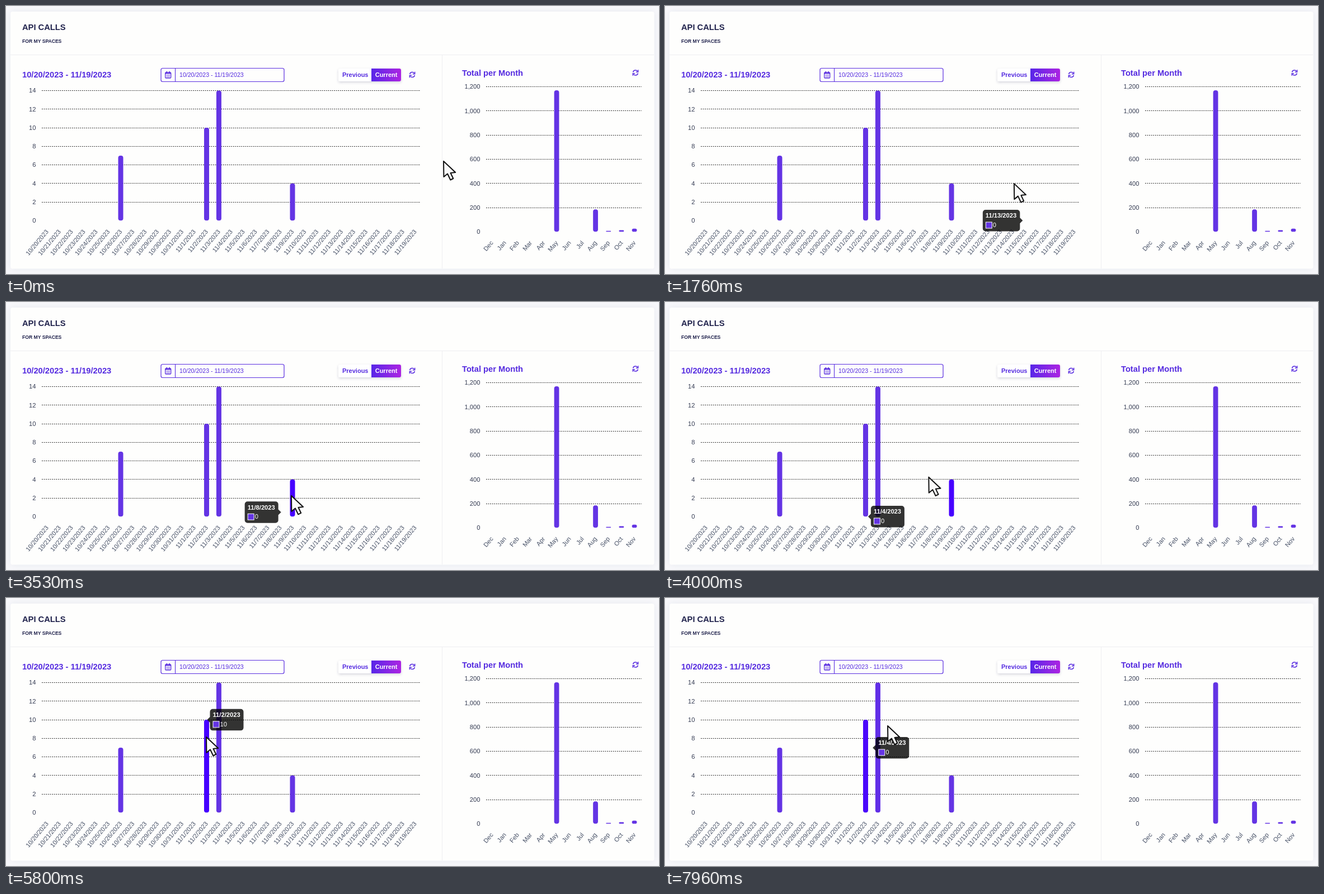
Write an HTML page that moves like this. It is 1167x480 px and loops after 8000 ms.

```html
<!DOCTYPE html>
<html lang="en">
<head>
<meta charset="utf-8">
<title>API calls</title>
<style>
html, body { margin: 0; width: 100%; height: 100%; overflow: hidden; background: #f8f8fb; }
svg { display: block; font-family: "Liberation Sans", Arial, sans-serif; }
.bold { font-weight: bold; }
.grid { stroke: #1c1c1c; stroke-dasharray: 1.8 1.8; }
.rule { stroke: #eeeef1; }
.icon { fill: none; stroke: #5a2ee0; stroke-width: 1.6; }
</style>
</head>
<body>
<svg id="stage" width="1167" height="480" viewBox="0 0 1167 480">
  <defs>
    <linearGradient id="active"><stop stop-color="#5828e8"/><stop offset="1" stop-color="#ac24e2"/></linearGradient>
    <filter id="cardShadow" x="-5%" y="-5%" width="110%" height="110%">
      <feDropShadow dx="0" dy="0" stdDeviation="7" flood-color="#8898aa" flood-opacity=".16"/>
    </filter>
    <filter id="btnShadow" x="-10%" y="-30%" width="120%" height="180%">
      <feDropShadow dx="0" dy="2" stdDeviation="2" flood-color="#32325d" flood-opacity=".2"/>
    </filter>
    <g id="refresh" class="icon">
      <path d="M-4.4-1A4.5 4.5 0 0 1 3.7-2.6M4.4 1A4.5 4.5 0 0 1-3.7 2.6"/>
      <path d="M4.7-5.2V-1.3H.9M-4.7 5.2V1.3H-.9" stroke-width="1.4"/>
    </g>
  </defs>
  <rect x="8" y="10" width="1150.5" height="460.5" rx="4" fill="#fefefd" filter="url(#cardShadow)"/>
  <path class="rule" d="M8 87.5H1158M779.5 87.5V470"/>
  <g filter="url(#btnShadow)">
    <rect x="594" y="112" width="112" height="23" rx="3" fill="#fff"/>
    <path d="M653 112H703a3 3 0 0 1 3 3V132a3 3 0 0 1-3 3H653Z" fill="url(#active)"/>
  </g>
  <g class="icon">
    <rect x="277" y="111.5" width="220" height="24" rx="3" stroke-width="1.2"/>
    <path d="M302.5 111.5V135.5" stroke-width="1.1"/>
    <rect x="284.7" y="119" width="10" height="10" rx="1.2" stroke-width="1.3"/>
    <path d="M284.7 120.7H294.7M287.3 117V120M292.2 117V120"/>
    <path d="M286.8 124H293M286.8 126.6H293" stroke-dasharray="1.5 .9" stroke-width="1.4"/>
  </g>
  <use href="#refresh" x="726" y="123"/>
  <use href="#refresh" x="1125" y="119.5"/>
  <g id="content"></g>
  <g id="tip">
    <path id="bubble" fill="#000" fill-opacity=".8"/>
    <text id="tipTitle" class="bold" x="5" y="14.4" font-size="11.2" fill="#fff"></text>
    <rect x="5.5" y="22" width="11" height="11" fill="#6434e4" stroke="#fff"/>
    <text id="tipValue" x="18" y="31" font-size="11.2" fill="#fff"></text>
  </g>
  <path id="cursor" d="M0 0L.4 28 7 22.5 12.3 33.5 17.3 31 12.5 21 21.2 20Z"
    fill="#fafafa" stroke="#111" stroke-width="2" stroke-linejoin="round"/>
</svg>
<script>
const $ = id => document.getElementById(id);
const content = $('content');
const DURATION = 8000, TIP_H = 38.5;
const BASE = [100, 52, 228], HOVER = [70, 0, 255];

function add(tag, attrs, text) {
  const el = document.createElementNS('http://www.w3.org/2000/svg', tag);
  for (const key in attrs) el.setAttribute(key, attrs[key]);
  if (text !== undefined) el.textContent = text;
  return content.appendChild(el);
}
const label = (text, x, y, size, fill, more) =>
  add('text', { x, y, 'font-size': size, fill, ...more }, text);

const bold = { class: 'bold' }, end = { 'text-anchor': 'end' };
const NAVY = '#20224c', VIOLET = '#552be0', INK = '#343b52';
const RANGE = '10/20/2023 - 11/19/2023';
label('API CALLS', 29, 42.5, 14.7, NAVY, bold);
label('FOR MY SPACES', 29, 66, 8.6, NAVY, bold);
label(RANGE, 29, 128, 14.7, VIOLET, bold);
label(RANGE, 310, 127, 10.6, VIOLET);
label('Previous', 601, 127, 11, VIOLET, bold);
label('Current', 659.7, 127, 11, '#fff', bold);
label('Total per Month', 815, 124.5, 14.7, VIOLET, bold);

// Draws axes and bars; returns the bars by index.
function chart(o) {
  for (let i = 0; i <= o.ticks; i++) {
    const y = o.zero - i * o.gap;
    if (i) add('path', { class: 'grid', d: `M${o.left} ${Math.floor(y) + .5}H${o.right}` });
    label((i * o.step).toLocaleString('en-US'), o.left - 10.5, y + 3.8, 11.2, INK, end);
  }
  o.names.forEach((name, i) => label(name, 0, 4, 11.2, '#465066',
    { ...end, transform: `translate(${o.first + i * o.pitch} ${o.zero + 17.7}) rotate(-50)` }));
  const bars = {};
  for (const i in o.values) {
    const h = o.values[i] * o.gap / o.step;
    bars[i] = add('rect', { x: o.first + i * o.pitch - o.width / 2, y: o.zero - h,
      width: o.width, height: h, rx: Math.min(4, h / 2), fill: `rgb(${BASE})` });
  }
  return bars;
}

const days = Array.from({ length: 31 }, (_, i) => {
  const d = new Date(2023, 9, 20 + i);
  return `${d.getMonth() + 1}/${d.getDate()}/2023`;
});
const daily = { names: days, values: { 6: 7, 13: 10, 14: 14, 20: 4 }, first: 73.4, pitch: 21.93,
  width: 9, left: 64, right: 741, zero: 384.3, gap: 33.24, step: 2, ticks: 7 };
const bars = chart(daily);
chart({ names: 'Dec Jan Feb Mar Apr May Jun Jul Aug Sep Oct Nov'.split(' '),
  values: { 5: 1170, 8: 185, 9: 7, 10: 13, 11: 26 }, first: 868.2, pitch: 23.17,
  width: 8.8, left: 858, right: 1136, zero: 404.3, gap: 43.3, step: 200, ticks: 6 });

const clamp = v => Math.max(0, Math.min(1, v));
const outQuad = u => 1 - (1 - u) ** 2;
const outQuart = u => 1 - (1 - u) ** 4;
const inQuad = u => u * u;
const smooth = u => u * u * (3 - 2 * u);
const inOutCubic = u => u < .5 ? 4 * u ** 3 : 1 - 4 * (1 - u) ** 3;

// start, end, x, y, easing
const moves = [
  [1467, 2300, 510, 347, outQuad],
  [3475, 4735, 377, 232.5, inOutCubic],
  [5000, 5750, 358, 249, smooth],
  [7670, 7960, 398, 229, inQuad]
];
// time, hovered day
const hovers = [
  [1490, 30], [1515, 29], [1551, 28], [1592, 27], [1637, 26], [1685, 25], [1738, 24],
  [1795, 23], [1863, 22], [1945, 21], [2062, 20],
  [3365, 19], [3560, 18], [3690, 17], [3800, 16], [3985, 15], [4310, 14],
  [5360, 13], [7800, 14], [7912, 15]
];
// day, start, length, direction
const fades = [
  [20, 2060, 400, 1], [20, 3980, 450, -1],
  [14, 4500, 400, 1], [14, 5080, 450, -1],
  [13, 5360, 430, 1], [13, 7860, 400, -1], [14, 7880, 400, 1]
];

function cursorAt(t) {
  let x = 782, y = 278;
  for (const [a, b, tx, ty, ease] of moves) {
    const k = ease(clamp((t - a) / (b - a)));
    x += (tx - x) * k;
    y += (ty - y) * k;
  }
  return [x, y];
}

function tipTarget(i) {
  const w = days[i].length > 9 ? 66.5 : 60;
  const cx = daily.first + i * daily.pitch;
  const top = daily.zero - (daily.values[i] || 0) * daily.gap / daily.step;
  if (i === 14) return { x: cx - w / 2, y: top + 7, w, side: 'top' };
  const left = i <= 15;
  return { x: left ? cx + 6 : cx - 6 - w, y: top - TIP_H / 2, w, side: left ? 'left' : 'right' };
}

function drawTip(t) {
  const past = hovers.filter(h => h[0] <= t);
  $('tip').setAttribute('opacity', past.length ? clamp((t - hovers[0][0]) / 200) : 0);
  if (!past.length) return;
  let { x, y } = tipTarget(past[0][1]);
  past.forEach(([start, i], n) => {
    const goal = tipTarget(i), until = n + 1 < past.length ? past[n + 1][0] : t;
    const k = outQuart(clamp((until - start) / 400));
    x += (goal.x - x) * k;
    y += (goal.y - y) * k;
  });
  const day = past[past.length - 1][1], { w, side } = tipTarget(day), mid = TIP_H / 2;
  const caret = {
    top: `M${w / 2 - 5} 0l5-5 5 5Z`,
    left: `M0 ${mid - 5}l-5 5 5 5Z`,
    right: `M${w} ${mid - 5}l5 5-5 5Z`
  }[side];
  $('bubble').setAttribute('d', `M5 0H${w - 5}a5 5 0 0 1 5 5V${TIP_H - 5}a5 5 0 0 1-5 5H5` +
    `a5 5 0 0 1-5-5V5a5 5 0 0 1 5-5Z${caret}`);
  $('tipTitle').textContent = days[day];
  $('tipValue').textContent = daily.values[day] || 0;
  $('tip').setAttribute('transform', `translate(${x} ${y})`);
}

function drawBars(t) {
  for (const i in bars) {
    let k = 0;
    for (const [day, start, length, dir] of fades)
      if (day == i) k += dir * smooth(clamp((t - start) / length));
    bars[i].setAttribute('fill', `rgb(${BASE.map((c, n) => Math.round(c + (HOVER[n] - c) * k))})`);
  }
}

const begin = performance.now();
function frame() {
  const t = (performance.now() - begin) % DURATION;
  drawBars(t);
  drawTip(t);
  $('cursor').setAttribute('transform', `translate(${cursorAt(t)})`);
  requestAnimationFrame(frame);
}
frame();
</script>
</body>
</html>
```
